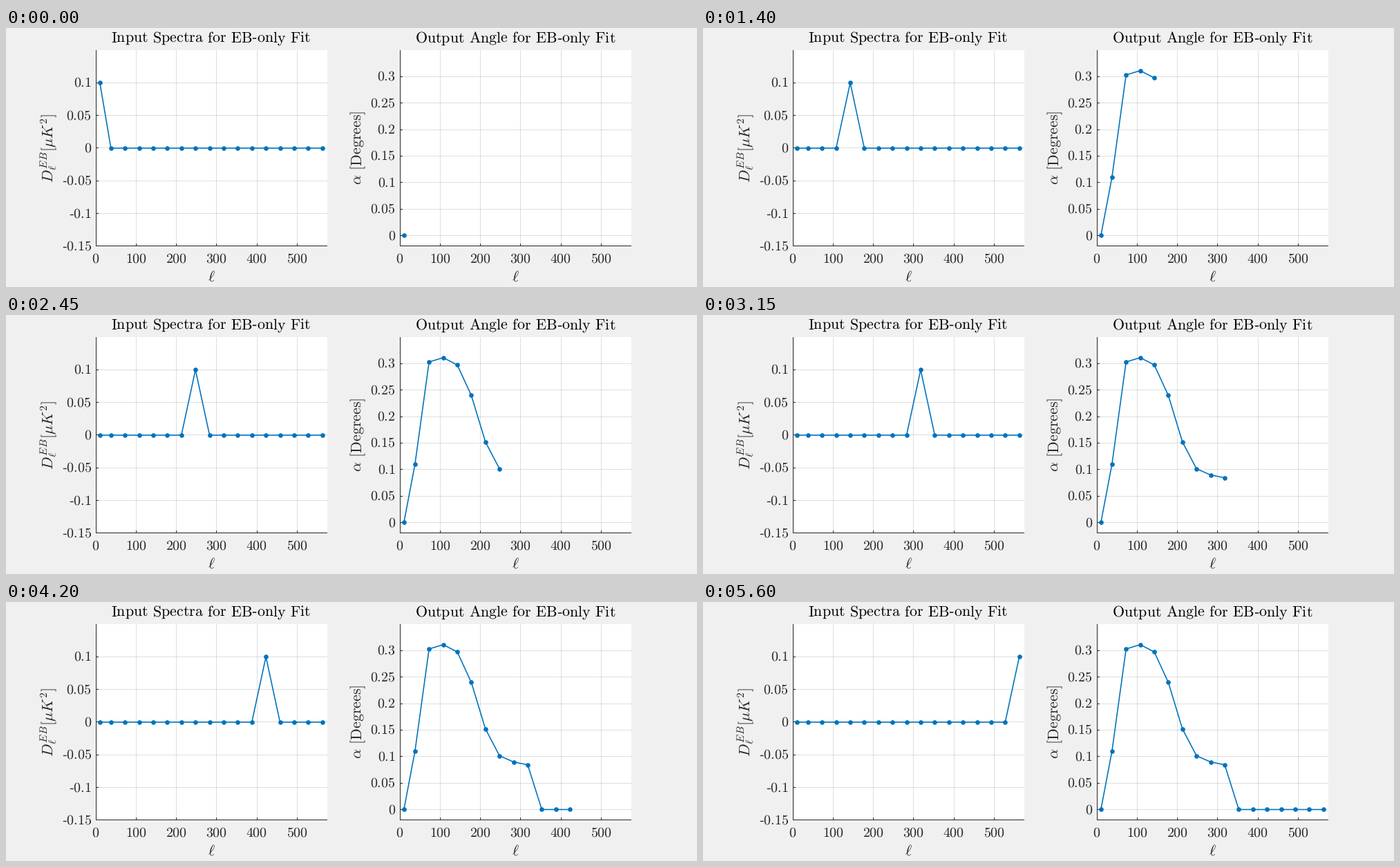
Recreate the animation shown at these times as a matplotlib script. Size 1000 by 375 pixels, loop 5950 ms.

```python
import matplotlib.pyplot as plt
import numpy as np
from matplotlib.animation import FuncAnimation
from matplotlib.patches import Rectangle

plt.rcParams["mathtext.fontset"] = "cm"
plt.rcParams["text.hinting"] = "none"

W, H = 1000, 375
PT = 0.72                      # points per pixel at 100 dpi
TOP, BOTTOM, WIDTH = 32.1, 315.8, 335
BLUE, INK = "#0072BD", "#262626"

ELL = np.concatenate([[10, 37.5], 72.5 + 35 * np.arange(15)])
ANGLE = np.zeros(len(ELL))
ANGLE[1:10] = [0.110, 0.3032, 0.3113, 0.2977, 0.240,
               0.1523, 0.1015, 0.0898, 0.0845]

fig = plt.figure(figsize=(W / 100, H / 100), dpi=100, facecolor="#f0f0f0")
canvas = fig.add_axes([0, 0, 1, 1])
canvas.set_xlim(0, W)
canvas.set_ylim(H, 0)
canvas.axis("off")


def roman(text):
    """Upright text with a true hyphen and full word spaces."""
    text = text.replace("-", "\u2010").replace(" ", r"\hspace{0.38}")
    return rf"\mathrm{{{text}}}"


def label(x, y, tex, size, ha="center", color=INK, rotation=0):
    canvas.text(x, y, f"${tex}$", fontsize=size * PT, ha=ha, va="baseline",
                color=color, rotation=rotation, rotation_mode="anchor")


def rule(x0, y0, x1, y1, alpha=1):
    canvas.plot([x0, x1], [y0, y1], color=INK, alpha=alpha, lw=PT, snap=False,
                solid_capstyle="butt", zorder=1 + alpha)


def grid_line(x0, y0, x1, y1):
    rule(x0, y0, x1, y1, alpha=0.15)


class Panel:
    def __init__(self, left, ylim, yticks, title, ylabel, ylabel_x):
        self.left, self.ylim = left, ylim
        x0, x1, y0, y1 = left, left + WIDTH, 32, 316
        mid = (x0 + x1) / 2

        canvas.add_patch(Rectangle((x0, y0), x1 - x0, y1 - y0, fc="white",
                                   lw=0, snap=False, zorder=0))
        for tick in range(0, 600, 100):
            px = np.floor(self.x(tick)) + 0.5
            if tick:
                grid_line(px, y0, px, y1 - 1)
                rule(px, y1 - 4, px, y1)
            label(self.x(tick), 340, roman(str(tick)), 20)
        for tick in yticks:
            py = np.floor(self.y(tick)) + 0.5
            if py < y1 - 1:
                grid_line(x0 + 1, py, x1, py)
                rule(x0, py, x0 + 4, py)
            label(x0 - 6, self.y(tick) + 5.6, roman(f"{tick:g}"), 20, "right")
        rule(x0 + 0.5, y0, x0 + 0.5, y1)
        rule(x0, y1 - 0.5, x1, y1 - 0.5)

        label(mid - 0.5, 21, roman(title), 22, color="black")
        label(mid, 367, r"\ell", 22)
        label(ylabel_x, (TOP + BOTTOM) / 2 - 0.2, ylabel, 22, rotation=90)
        self.curve, = canvas.plot([], [], "o-", color=BLUE, lw=1.6 * PT,
                                  ms=6.67 * PT, mew=0, zorder=3)

    def x(self, ell):
        return self.left + WIDTH * ell / 575

    def y(self, value):
        low, high = self.ylim
        return BOTTOM - (BOTTOM - TOP) * (value - low) / (high - low)

    def show(self, ell, values):
        self.curve.set_data(self.x(ell), self.y(values))


spectrum = Panel(130, (-0.15, 0.15), [-0.15, -0.1, -0.05, 0, 0.05, 0.1],
                 "Input Spectra for EB-only Fit",
                 r"D_\ell^{EB}[\mu K^{\mathrm{2}}]", 68)
angle = Panel(570, (-0.02, 0.35), [0, 0.05, 0.1, 0.15, 0.2, 0.25, 0.3],
              "Output Angle for EB-only Fit",
              r"\alpha" + roman(" [Degrees]"), 515)


def update(i):
    spectrum.show(ELL, np.where(np.arange(len(ELL)) == i, 0.1, 0.0))
    angle.show(ELL[:i + 1], ANGLE[:i + 1])
    return spectrum.curve, angle.curve


anim = FuncAnimation(fig, update, frames=len(ELL), interval=350, repeat=True)
plt.show()
```
